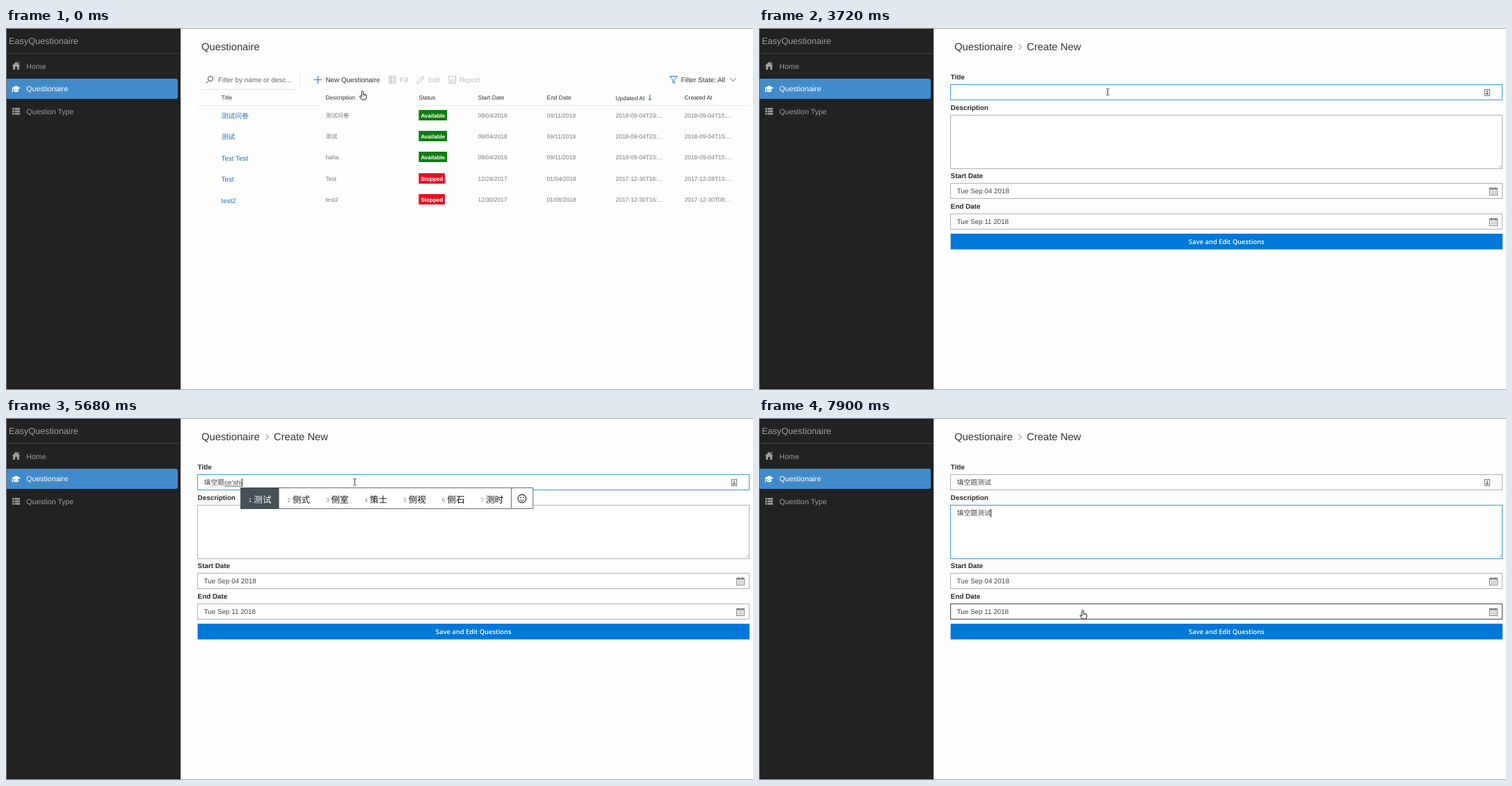
Write an HTML page that moves like this. It is 1074 by 521 pixels and loops after 8000 ms.

```html
<!DOCTYPE html>
<html lang="en">
<head>
<meta charset="utf-8">
<title>Questionaire</title>
<style>
html, body { margin: 0; width: 100%; height: 100%; overflow: hidden; background: #fefefe; }
svg { display: block; width: 1074px; height: 521px; }
text { font-family: "Liberation Sans", "Noto Sans CJK SC", "Noto Sans CJK", sans-serif; text-rendering: geometricPrecision; white-space: pre; }
.save { font-family: "Open Sans", "Noto Sans", sans-serif; }
</style>
</head>
<body>
<svg id="stage" viewBox="0 0 1074 521"></svg>
<script>
const NS = "http://www.w3.org/2000/svg";
const stage = document.getElementById("stage");
const LOOP = 8000, BODY = 9.86, SMALL = 8.45;
const BLUE = "#2f6fc1", INK = "#333";

function add(parent, tag, attrs) {
  const el = document.createElementNS(NS, tag);
  for (const k in attrs) el.setAttribute(k, attrs[k]);
  parent.appendChild(el);
  return el;
}
const group = (p, attrs) => add(p, "g", attrs);
const rect = (p, x, y, w, h, fill, more) => add(p, "rect", { x, y, width: w, height: h, fill, ...more });
const line = (p, d, stroke, w = 1) => add(p, "path", { d, stroke, "stroke-width": w, fill: "none" });
const shape = (p, d, fill) => add(p, "path", { d, fill });
function text(p, x, y, str, size, fill, more) {
  const el = add(p, "text", { x, y, "font-size": size, fill, ...more });
  el.textContent = str;
  return el;
}
const show = (el, on) => el.setAttribute("display", on ? "inline" : "none");
const move = (el, x, y) => el.setAttribute("transform", `translate(${x} ${y})`);

function drawSidebar() {
  const g = group(stage);
  rect(g, 0, 0, 251, 521, "#222");
  text(g, 4, 22.5, "EasyQuestionaire", 12.67, "#9d9d9d");
  rect(g, 0, 36, 250, 1, "#414141");
  rect(g, -4, 73, 251, 29, "#428bca", { rx: 3 });
  [["Home", 59, "#9d9d9d"], ["Questionaire", 91, "#fff"], ["Question Type", 124, "#9d9d9d"]]
    .forEach(([s, y, c]) => text(g, 29.3, y, s, 10.58, c));
  shape(g, "M14.5 48.5L20.5 54.5H19V60H16V56H13V60H10V54.5H8.5ZM17.3 49H18.8V52L17.3 50.6Z", "#9d9d9d");
  shape(g, "M8 86.3L14.5 83L21 86.3L14.5 89.4ZM11 88.6L14.5 90.3L18 88.6V91Q14.5 93.6 11 91ZM9 87.2H10V92.5H8.6Z", "#fff");
  for (let i = 0; i < 3; i++) {
    rect(g, 9, 115 + i * 3.6, 2.6, 2.6, "#9d9d9d");
    rect(g, 12.5, 115 + i * 3.6, 7.5, 2.6, "#9d9d9d");
  }
}

function drawList() {
  const g = group(stage);
  const cols = [309.5, 459.5, 593.5, 678.5, 777.5, 876.5, 975.5];
  const hover = rect(g, 437, 61, 107, 27, "#f1f1f1");
  add(g, "circle", { cx: 294, cy: 73, r: 3.6, fill: "none", stroke: "#444" });
  line(g, "M291.3 75.8L287.5 79.5", "#444");
  text(g, 305, 77.6, "Filter by name or desc...", BODY, "#666");
  rect(g, 281, 88, 135, 1, "#e6e6e6");
  rect(g, 422, 61, 1, 27, "#e6e6e6");
  line(g, "M442.5 74.5H454M448.5 69V80", BLUE, 1.1);
  text(g, 459.5, 78, "New Questionaire", BODY, INK);
  const off = "#bdbdbd";
  line(g, "M551 69.5H559.5V79.5H551ZM551 73H559.5M551 76.3H559.5M553.6 70V79", off);
  text(g, 566, 78, "Fill", BODY, off);
  line(g, "M591 80L592 76.5L599 69.5L601.3 71.7L594.3 78.8ZM597.5 71L599.8 73.3", off);
  text(g, 607, 78, "Edit", BODY, off);
  line(g, "M637 69.5H646.5V79.5H637ZM639.5 78V74.5M642 78V72M644.3 78V75.5", off);
  text(g, 652, 78, "Report", BODY, off);
  line(g, "M954.5 69.5H965L961 74.5V80L958.6 78.5V74.5Z", BLUE);
  text(g, 970.5, 78, "Filter State: All", BODY, INK);
  line(g, "M1041 72.2L1045.3 76.5L1049.6 72.2", "#555");
  rect(g, 275, 111, 178, 1, "#e8e8e8");
  rect(g, 588, 111, 481, 1, "#e8e8e8");
  ["Title", "Description", "Status", "Start Date", "End Date", "Updated At", "Created At"]
    .forEach((s, i) => text(g, cols[i], i === 5 ? 104 : 103, s, SMALL, INK));
  line(g, "M925.7 96V104M923.6 101.8L925.7 104L927.8 101.8", BLUE);
  const late = ["Stopped", "#e81123"], live = ["Available", "#107c10"];
  const fall = ["09/04/2018", "09/11/2018", "2018-09-04T23:...", "2018-09-04T15:..."];
  [["测试问卷", "测试问卷", live, ...fall],
   ["测试", "测试", live, ...fall],
   ["Test Test", "haha", live, ...fall],
   ["Test", "Test", late, "12/28/2017", "01/04/2018", "2017-12-30T16:...", "2017-12-28T13:..."],
   ["test2", "test2", late, "12/30/2017", "01/06/2018", "2017-12-30T16:...", "2017-12-30T08:..."]
  ].forEach((row, r) => {
    const y = 128.5 + r * 30.45;
    row.forEach((cell, c) => {
      if (c === 2) {
        rect(g, 593.4, Math.round(y - 11), cell === live ? 40.6 : 37.6, 15, cell[1]);
        text(g, 596.4, y, cell[0], 8, "#fff", { "font-weight": 700 });
      } else {
        text(g, cols[c], c ? y : y + 1.2, cell, c ? SMALL : BODY, c ? "#757575" : "#2672b8");
      }
    });
  });
  return { g, hover };
}

function drawForm() {
  const g = group(stage);
  line(g, "M373.3 23.3L377.3 27.3L373.3 31.3", "#777");
  text(g, 385, 32, "Create New", 14.78, INK);
  [["Title", 74], ["Description", 118], ["Start Date", 216], ["End Date", 260]]
    .forEach(([s, y]) => text(g, 275.6, y, s, BODY, "#2a2a2a", { "font-weight": 700 }));
  const box = {};
  [["title", 81.5, 22], ["desc", 125.5, 77], ["start", 223.5, 22], ["end", 267.5, 22]]
    .forEach(([k, y, h]) => box[k] = rect(g, 275.5, y, 793, h, "#fff", { "stroke-width": 1 }));
  line(g, "M1063.5 201L1067.5 197M1066 201L1067.5 199.5", "#999", 0.8);
  [["Tue Sep 04 2018", 238], ["Tue Sep 11 2018", 282]].forEach(([s, y]) => {
    text(g, 284.6, y, s, BODY, "#444");
    const c = group(g);
    move(c, 1050.5, y - 8.5);
    rect(c, 0, 1, 11, 10, "#fff", { stroke: "#777", "stroke-width": 0.9 });
    rect(c, 0, 1, 11, 2.2, "#888");
    line(c, "M2.5 -.5V2M8.5 -.5V2", "#777");
    line(c, "M1 5.5H10.5M1 8.2H10.5M3 4V11M5.6 4V11M8.2 4V11", "#aaa", 0.7);
  });
  rect(g, 275.5, 296, 793.5, 22.6, "#0078d7");
  text(g, 672.2, 311.2, "Save and Edit Questions", 9.4, "#fff",
    { class: "save", "font-weight": 600, "text-anchor": "middle" });
  const icon = group(g);
  rect(icon, 1043.5, 88.5, 7, 9, "#fff", { stroke: "#777" });
  shape(icon, "M1047 90a1.3 1.3 0 0 1 0 2.6a1.3 1.3 0 0 1 0-2.6ZM1045 96Q1045 93 1047 93Q1049 93 1049 96Z", "#777");
  const field = y => ({
    done: text(g, 284.6, y, "", BODY, "#444"),
    raw: text(g, 284.6, y, "", BODY, "#444"),
    under: rect(g, 0, y + 1.5, 0, 1, "#555"),
    caret: rect(g, 0, y - 9, 1, 12, "#333")
  });
  return { g, box, icon, title: field(96), desc: field(139.8), ime: group(g) };
}

// Candidate window of the input method
function drawIme(g, left, words) {
  g.replaceChildren();
  const width = w => 30.4 + 12.6 * w.length;
  const sep = left + words.reduce((a, w) => a + width(w), 0);
  rect(g, left + 0.5, 100.5, sep + 31 - left, 30, "#fff", { stroke: "#6a6f72" });
  rect(g, left, 100, width(words[0]), 31, "#465157");
  let x = left;
  words.forEach((w, i) => {
    text(g, x + 11.8, 121, i + 1, 8.3, i ? "#888" : "#e4e4e4");
    text(g, x + 19.3, 121.6, w, 12.6, i ? "#111" : "#fff");
    x += width(w);
  });
  rect(g, Math.round(sep), 100, 1, 31, "#6a6f72");
  const cx = sep + 15.7;
  add(g, "circle", { cx, cy: 116, r: 5.9, fill: "none", stroke: "#222", "stroke-width": 1.1 });
  for (const dx of [-2.1, 2.1]) add(g, "circle", { cx: cx + dx, cy: 114.3, r: 0.9, fill: "#222" });
  line(g, `M${cx - 3} 117.3Q${cx} 121.6 ${cx + 3} 117.3`, "#222");
}

function drawHand() {
  const g = group(stage);
  add(g, "path", {
    d: "M-1.2 .9Q0 -.5 1.2 .9V5L4.6 5.7Q5.8 6 5.8 7.3V9.6L4.6 12.8H-1L-3.8 8.6Q-4.2 7 -2.7 7.3L-1.2 8.7Z",
    fill: "#fff", stroke: "#222", "stroke-width": 1, "stroke-linejoin": "round"
  });
  line(g, "M1.3 5V7.4M2.9 5.6V7.6M4.4 6V7.8", "#333", 0.6);
  return g;
}

rect(stage, 0, 0, 1074, 521, "#fefefe");
drawSidebar();
text(stage, 281, 32, "Questionaire", 14.78, INK);
const list = drawList(), form = drawForm();
rect(stage, 0, 0, 1074, 1, "#aaa");
rect(stage, 0, 0, 1, 521, "#777");
rect(stage, 0, 520, 1074, 1, "#aaa");
const hand = drawHand();
const beam = group(stage);
line(beam, "M-2.2 -4.5H-.7L0 -4L.7 -4.5H2.2M0 -4V4M-2.2 4.5H-.7L0 4L.7 4.5H2.2", "#333", 0.9);

// Each step changes only the named values; the rest carry over.
const all = "填空题测试";
const steps = [
  [0, { page: "list", cur: "hand", x: 512.5, y: 90.3, hover: "", focus: "", caret: false, icon: false, done: "", raw: "", words: "", desc: "" }],
  [120, { x: 513.5, y: 85, hover: "new" }],
  [250, { x: 514, y: 80 }],
  [550, { page: "form", cur: "beam", y: 84, hover: "title" }],
  [830, { x: 509, y: 88 }],
  [950, { x: 501.5, y: 92 }],
  [1070, { focus: "title", caret: true }],
  [1620, { caret: false }],
  [2180, { caret: true, icon: true }],
  [2580, { caret: false }],
  [3160, { caret: true }],
  [3720, { caret: false }],
  [3880, { caret: true, raw: "tian", words: "天 填 田 甜 添 舔 恬" }],
  [4030, { raw: "tian'k", words: "天空 填空 田坎 天坑 天快 甜口 天宽" }],
  [4180, { raw: "tian'kong", words: "天空 填空 天 填 田 甜 添" }],
  [4330, { raw: "tian'kong'ti", words: "填空题 天空 填空 天 填 田 甜" }],
  [4890, { caret: false }],
  [5040, { caret: true, done: "填空题", raw: "", words: "" }],
  [5440, { raw: "ce", words: "测 侧 策 册 厕 侧 恻" }],
  [5560, { raw: "ce'sh", words: "测试 侧式 测算 策士 侧视 侧石 测时" }],
  [5680, { raw: "ce'shi", words: "测试 侧式 侧室 策士 侧视 侧石 测时" }],
  [5810, { done: all, raw: "", words: "" }],
  [5960, { y: 91 }],
  [6110, { x: 497.5 }],
  [6260, { x: 493.5 }],
  [6410, { x: 475, y: 110, hover: "", caret: false }],
  [6530, { x: 443, y: 139, hover: "desc" }],
  [6680, { x: 432.5, y: 152 }],
  [7210, { focus: "desc", caret: true }],
  [7510, { desc: all }],
  [7640, { x: 440, y: 205, hover: "" }],
  [7780, { cur: "hand", x: 457, y: 238, hover: "start" }],
  [7900, { x: 465.5, y: 276.3, hover: "end" }]
];

function setField(f, done, raw, caretOn) {
  f.done.textContent = done;
  f.raw.textContent = raw;
  const start = 284.6 + (done ? f.done.getComputedTextLength() : 0);
  const len = raw ? f.raw.getComputedTextLength() : 0;
  f.raw.setAttribute("x", start);
  f.under.setAttribute("x", start);
  f.under.setAttribute("width", len);
  f.caret.setAttribute("x", Math.floor(start + len));
  show(f.caret, caretOn);
  return start + len;
}

function render(s) {
  show(list.g, s.page === "list");
  show(form.g, s.page === "form");
  show(list.hover, s.hover === "new");
  show(hand, s.cur === "hand");
  show(beam, s.cur === "beam");
  move(s.cur === "hand" ? hand : beam, s.x, s.y);
  for (const k in form.box)
    form.box[k].setAttribute("stroke", s.focus === k ? "#3a96dd" : s.hover === k ? "#444" : "#b0b0b0");
  show(form.icon, s.icon);
  const end = setField(form.title, s.done, s.raw, s.caret && s.focus === "title");
  setField(form.desc, s.desc, "", s.caret && s.focus === "desc");
  show(form.ime, !!s.words);
  if (s.words) drawIme(form.ime, Math.round(end - 2.5), s.words.split(" "));
}

let shown = -1;
function tick() {
  const t = performance.now() % LOOP;
  const n = steps.filter(([at]) => at <= t).length;
  if (n !== shown) {
    shown = n;
    render(Object.assign({}, ...steps.slice(0, n).map(([, change]) => change)));
  }
  requestAnimationFrame(tick);
}
tick();
</script>
</body>
</html>
```
